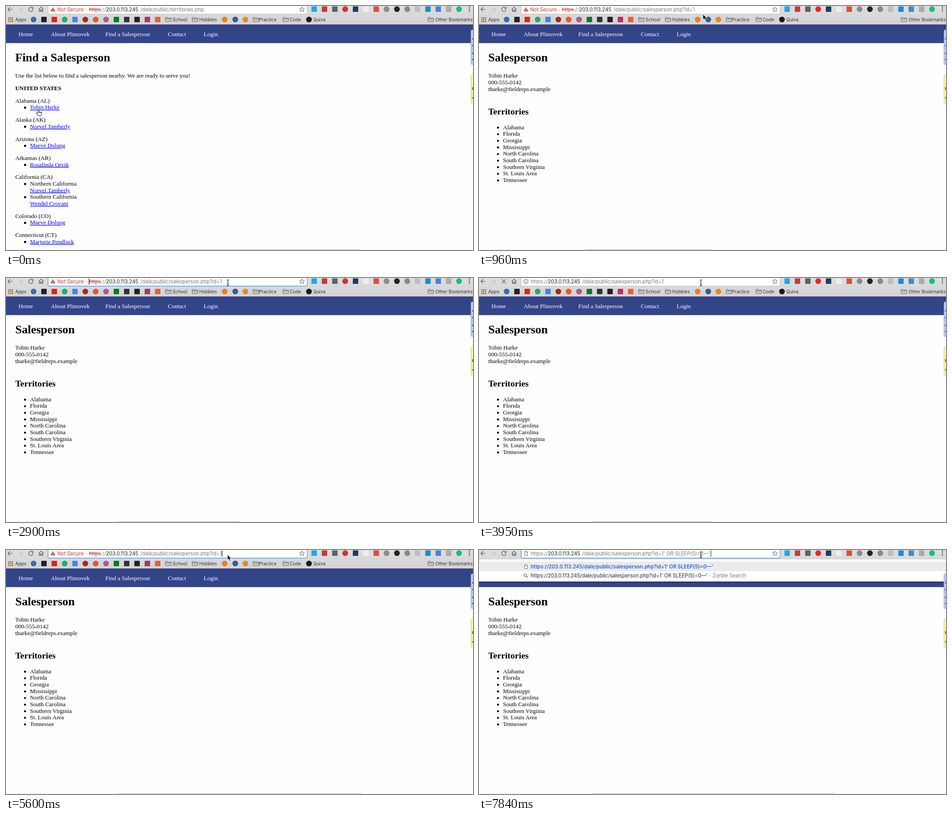
Write an HTML page that moves like this. It is 1032 px wide and 542 px high and loops after 8000 ms.

```html
<!DOCTYPE html>
<html lang="en">
<head>
<meta charset="utf-8">
<title>Sales directory</title>
<style>
  html, body { margin: 0; width: 100%; height: 100%; overflow: hidden; background: #fff; }
  svg { display: block; width: 1032px; height: 542px; }
  text { white-space: pre; }
  .ui { font: 11.1px Inter, "Open Sans", sans-serif; fill: #777; }
  .mark { font: 10px Inter, "Open Sans", sans-serif; fill: #333; }
  .body { font: 13.03px "Liberation Serif", "Times New Roman", serif; fill: #000; }
  .strong { font-weight: 700; }
  .link { fill: #00e; text-decoration: underline; }
  .line { fill: none; stroke: #666; stroke-width: 1.4; }
</style>
</head>
<body>
<svg id="stage" viewBox="0 0 1032 542" xmlns="http://www.w3.org/2000/svg"></svg>
<script>
const LINE = 14.66;
const HOST = '203.0.113.245';
const PERSON = '/dale/public/salesperson.php?id=1';
const TYPED = PERSON + '‘ OR SLEEP(5)=0—‘';

const rect = (x, y, w, h, fill, more = '') =>
  `<rect x="${x}" y="${y}" width="${w}" height="${h}" fill="${fill}" ${more}/>`;
const dot = (x, y, r, fill) => `<circle cx="${x}" cy="${y}" r="${r}" fill="${fill}"/>`;
const path = (d, more = 'class="line"') => `<path d="${d}" ${more}/>`;
const text = (x, y, s, cls = 'body', more = '') =>
  `<text x="${x}" y="${y}" class="${cls}" ${more}>${s}</text>`;
const group = (id, inner) => `<g id="${id}">${inner}</g>`;
const title = (y, size, s) => text(20.4, y, s, 'body strong', `style="font-size:${size}px"`);

// Address in three pieces: scheme, host, path
function address(x, tail, unsafe) {
  const scheme = unsafe
    ? '<tspan fill="#c53929" text-decoration="line-through">https</tspan>://'
    : 'https://';
  return text(x, 11.6, scheme, 'ui') +
    text(x + 38, 11.6, HOST, 'ui', 'style="fill:#222"') +
    text(x + 114, 11.6, tail, 'ui');
}

const warning =
  path('M103.7 2.6L108.8 11.8H98.6Z', 'fill="#c53929"') +
  rect(103.1, 5.6, 1.2, 3, '#fff') + rect(103.1, 9.4, 1.2, 1.2, '#fff') +
  text(113.2, 11.6, 'Not Secure', 'ui', 'style="fill:#c53929"') +
  rect(177, 2, 1, 11, '#ccc');

const info =
  '<circle cx="103.6" cy="7.4" r="4.7" class="line" style="stroke-width:1.1"/>' +
  rect(103, 6.6, 1.2, 3.4, '#666') + rect(103, 4.6, 1.2, 1.2, '#666');

const sheet = y =>
  path(`M100.8 ${y - 4.5}H104.6L107 ${y - 2}V${y + 4.7}H100.8ZM104.4 ${y - 4.5}V${y - 2}H107`,
    'fill="#fff" stroke="#666"');

const folder = x =>
  path(`M${x} 26.2Q${x} 25.2 ${x + 1} 25.2H${x + 4.5}L${x + 5.8} 26.7H${x + 11.5}Q${x + 12.5} 26.7 ${x + 12.5} 27.7` +
    `V33.6Q${x + 12.5} 34.6 ${x + 11.5} 34.6H${x + 1}Q${x} 34.6 ${x} 33.6ZM${x} 28.4H${x + 12.5}`,
    'fill="#c6c6c6" stroke="#6d6d6d"');

const badge = (x, y, color, round) =>
  round ? dot(x, y, 6.3, color) : rect(x - 6, y - 6, 12, 12, color, 'rx="1"');

function toolbar() {
  const nav =
    path('M14.5 7.4H4.5M9 2.6L4.2 7.4L9 12.2') +
    path('M26.5 7.4H36.5M32 2.6L36.8 7.4L32 12.2', 'fill="none" stroke="#c3c3c3" stroke-width="1.4"') +
    path('M72.2 7.8L77.6 2.4L83 7.8M74 6.8V12.4H76.3V8.8H79V12.4H81.2V6.8');
  const star = path('M654 2L655.5 5.8L659.5 6.1L656.4 8.6L657.4 12.5L654 10.3L650.6 12.5L651.6 8.6L648.5 6.1L652.5 5.8Z',
    'fill="none" stroke="#666"');
  const tools = [['#1ba8ee'], ['#c23b35'], ['#596170'], ['#e02a28', 1], ['#183c66'], ['#eee'],
    ['#e04b40'], ['#8b8b8b', 1], ['#222', 1], ['#888', 1], ['#bdbdbd'], ['#168edc'],
    ['#4388c8'], ['#a9a9a9'], ['#15bd82', 1]]
    .map(([c, round], i) => badge(681 + i * 22.86, 7, c, round)).join('');
  const more = [2.5, 7, 11.5].map(y => dot(1024, y, 1.4, '#555')).join('');
  return { back: rect(0, 0, 1032, 41, 'url(#chrome)'), front: nav + star + tools + more };
}

function bookmarks() {
  const hues = ['#e34b3d', '#eda12b', '#52a655', '#4285d8'];
  let out = '';
  for (let i = 0; i < 9; i++)
    out += rect(5 + i % 3 * 4, 25 + Math.floor(i / 3) * 4, 2.8, 2.8, hues[(i * 3 + i % 2) % 4]);
  out += [['#326fb9', 1], ['#222'], ['#e62117'], ['#2aa866', 1], ['#4285e8'], ['#a82b22', 1],
    ['#f2502a', 1], ['#b0568a', 1], ['#087a24'], ['#333'], ['#222'], ['#b82c70'], ['#ed5c29']]
    .map(([c, round], i) => badge(61 + i * 22.86, 30, c, round)).join('');
  out += badge(483.3, 30, '#ef7c24', 1) + badge(506.6, 30, '#315e96', 1) +
    badge(529, 30, '#e48a24', 1) + badge(669.5, 30, '#181818', 1);
  out += [352.5, 411.5, 546, 612, 932.5].map(folder).join('');
  out += [[20.5, 'Apps'], [368, 'School'], [427, 'Hobbies'], [559, 'Practice'], [627, 'Code'],
    [679, 'Quiva'], [949, 'Other Bookmarks']]
    .map(([x, s]) => text(x, 33.6, s, 'mark')).join('');
  return out;
}

function siteNav() {
  return rect(0, 41, 1032, 41.4, '#348') +
    [[27.8, 'Home'], [99, 'About Plimovek'], [219.6, 'Find a Salesperson'], [357.5, 'Contact'], [437, 'Login']]
      .map(([x, s]) => text(x, 67, s, 'body', 'style="fill:#fff"')).join('');
}

function listPage() {
  let y = 214.8;
  let out = title(123, 26.06, 'Find a Salesperson') +
    text(20.4, 159.3, 'Use the list below to find a salesperson nearby. We are ready to serve you!') +
    text(20.4, 187, 'UNITED STATES', 'body strong');
  const add = (x, s, cls) => { out += text(x, y, s, cls); y += LINE; };
  const bullet = () => { out += rect(40, y - 5.8, 4.4, 4.4, '#000'); };
  const who = s => add(53, s, 'body link');
  const states = [
    ['Alabama (AL)', 'Tobin Harke'],
    ['Alaska (AK)', 'Norvel Tamberly'],
    ['Arizona (AZ)', 'Maeve Dolung'],
    ['Arkansas (AR)', 'Rosalinda Orvik'],
    ['California (CA)', ['Northern California', 'Norvel Tamberly'], ['Southern California', 'Wendel Crovani']],
    ['Colorado (CO)', 'Maeve Dolung'],
    ['Connecticut (CT)', 'Marjorie Pendlock']
  ];
  for (const [state, ...rows] of states) {
    add(20.4, state);
    for (const row of rows) {
      bullet();
      if (Array.isArray(row)) { add(53, row[0]); who(row[1]); } else who(row);
    }
    y += 13.07;
  }
  return out;
}

function personPage() {
  const lines = ['Tobin Harke', '000-555-0142', 'tharke@fieldreps.example'];
  const areas = ['Alabama', 'Florida', 'Georgia', 'Mississippi', 'North Carolina', 'South Carolina',
    'Southern Virginia', 'St. Louis Area', 'Tennessee'];
  return title(123, 26.06, 'Salesperson') +
    lines.map((s, i) => text(20.4, 159.3 + i * LINE, s)).join('') +
    title(241, 19.55, 'Territories') +
    areas.map((s, i) => dot(42, 270.2 + i * LINE, 2.2, '#000') + text(53, 273.8 + i * LINE, s)).join('');
}

function notes() {
  const note = (y, h, fill, edge, marks) =>
    rect(1027.5, y, 12, h, fill, `rx="3" stroke="${edge}"`) +
    marks.map(m => rect(1030, m, 2, 2, '#222')).join('');
  return note(53, 77, '#b7ccfa', '#8fa5d8', [72, 87, 104, 118]) +
    note(153, 63, '#fdf2a0', '#d8c974', [181, 184, 203]);
}

function menu() {
  const full = 'https://' + HOST + TYPED;
  return rect(0, 21, 1032, 49, '#fff') + rect(0, 26, 1032, 21, '#ebebeb') +
    rect(0, 70, 1032, 4, 'url(#shade)') +
    sheet(37) + text(114.3, 41, full, 'ui', 'style="fill:#2f62d9;font-weight:600"') +
    '<circle cx="102.4" cy="56" r="3" class="line" style="stroke-width:1.2"/>' + path('M104.6 58.2L108 61.6') +
    text(114.3, 61.2, full + '<tspan fill="#777"> - Zorble Search</tspan>', 'ui', 'style="fill:#222"');
}

const pointers = {
  hand: path('M-2 -5.5Q-2 -7 -.7 -7Q.5 -7 .5 -5.5V-2.2Q2 -3 2.6 -1.8Q4.3 -2.4 4.7 -1Q6.4 -1.2 6.4 .6V3Q6 5 5 6.8H-1.6Q-3.4 4 -5.6 1.4Q-5.6 -.4 -3.6 .4L-2 2ZM.6 -2V1M2.7 -1.6V1M4.7 -.8V1.4',
    'fill="#fff" stroke="#111" stroke-width="1"'),
  arrow: path('M0 0V11.8L2.7 9.3L4.6 13.6L6.5 12.8L4.7 8.6H8.3Z', 'fill="#000" stroke="#fff" stroke-width=".8"'),
  beam: path('M-2.6 -6.5Q0 -6.5 0 -5V5Q0 6.5 -2.6 6.5M2.6 -6.5Q0 -6.5 0 -5V5Q0 6.5 2.6 6.5M-1.5 2H1.5',
    'fill="none" stroke="#111" stroke-width="1.1"')
};

const bar = toolbar();
document.getElementById('stage').innerHTML =
  `<defs>
    <linearGradient id="chrome" x2="0" y2="1"><stop stop-color="#dedede"/><stop offset="1" stop-color="#d3d3d3"/></linearGradient>
    <linearGradient id="shade" x2="0" y2="1"><stop stop-color="#000" stop-opacity=".3"/><stop offset="1" stop-color="#000" stop-opacity="0"/></linearGradient>
  </defs>` +
  rect(0, 0, 1032, 542, '#fefefe') +
  group('page-list', listPage()) + group('page-person', personPage()) +
  rect(0, 540.6, 1032, 1.4, '#eee') + rect(0, 540, 0, 2, '#d2d2d2', 'id="scroll"') +
  bar.back + bookmarks() + siteNav() + group('menu', menu()) + notes() +
  rect(93, -6, 572.5, 24, '#fff', 'rx="3" stroke="#b9b9b9"') +
  rect(93, -6, 572.5, 24, 'none', 'rx="3" stroke="#6ba2e4" stroke-width="1.4" id="ring"') +
  bar.front +
  group('idle', path('M59 4.6A4.8 4.8 0 1 0 59.8 8.2') + path('M60.4 1.8V6.4H55.8Z', 'fill="#666"')) +
  group('busy', path('M50.3 2.8L59.5 12M59.5 2.8L50.3 12')) +
  rect(183, 1, 295, 14, '#b3d5fd', 'id="sel"') +
  group('url-list', warning + address(183, '/dale/public/territories.php', true)) +
  group('url-load', info + address(114.3, PERSON)) +
  group('url-person', warning + address(183, PERSON, true)) +
  group('url-typed', sheet(7.3) + address(114.3, TYPED)) +
  rect(0, 1, 1, 14, '#000', 'id="caret"') +
  group('pointer', Object.entries(pointers).map(([k, s]) => group(k, s)).join(''));

// Each step changes only what it names
const steps = [
  [0, { page: 'list', url: 'list', busy: 0, ring: 0, sel: 0, caret: 0, menu: 0, cur: ['hand', 72.5, 237], scroll: [251, 784] }],
  [150, { url: 'load', busy: 1 }],
  [310, { cur: ['arrow', 110, 215] }],
  [470, { page: 'person', cur: ['arrow', 235, 148], scroll: [235, 341] }],
  [640, { url: 'person', cur: ['arrow', 392, 68] }],
  [800, { busy: 0, cur: ['arrow', 478, 28] }],
  [960, { cur: ['arrow', 495, 18.5], scroll: [235, 515] }],
  [1110, { cur: ['arrow', 486.5, 20.5], scroll: [249, 515] }],
  [1250, { ring: 0.5, sel: 1 }],
  [1400, { ring: 1 }],
  [1700, { sel: 0, caret: 183 }],
  [2300, { caret: 0, cur: ['arrow', 487, 16] }],
  [2450, { cur: ['beam', 489, 12] }],
  [2600, { cur: ['beam', 490.4, 10.5] }],
  [2900, { caret: 183 }],
  [3350, { caret: 0 }],
  [3650, { caret: 477 }],
  [3950, { caret: 0, ring: 0, url: 'load', busy: 1 }],
  [4550, { url: 'person', scroll: [249, 785] }],
  [4850, { busy: 0 }],
  [5300, { ring: 1, sel: 1, cur: ['arrow', 489.5, 10.5] }],
  [5600, { sel: 0, caret: 477 }],
  [6200, { caret: 0 }],
  [6800, { caret: 477 }],
  [7250, { caret: 0 }],
  [7700, { url: 'typed', caret: 512, cur: ['beam', 490.4, 10.5] }],
  [7840, { menu: 1 }]
];

const el = id => document.getElementById(id);
const show = (id, on) => { el(id).style.display = on ? '' : 'none'; };

function render(t) {
  const s = Object.assign({}, ...steps.filter(([at]) => at <= t).map(([, change]) => change));
  for (const p of ['list', 'person']) show('page-' + p, s.page === p);
  for (const u of ['list', 'load', 'person', 'typed']) show('url-' + u, s.url === u);
  for (const k in pointers) show(k, s.cur[0] === k);
  show('busy', s.busy);
  show('idle', !s.busy);
  show('menu', s.menu);
  show('sel', s.sel);
  show('caret', s.caret);
  el('caret').setAttribute('x', s.caret);
  el('ring').style.opacity = s.ring;
  el('pointer').setAttribute('transform', `translate(${s.cur[1]} ${s.cur[2]})`);
  el('scroll').setAttribute('x', s.scroll[0]);
  el('scroll').setAttribute('width', s.scroll[1] - s.scroll[0]);
}

const start = performance.now();
function tick() {
  render((performance.now() - start) % 8000);
  requestAnimationFrame(tick);
}
tick();
</script>
</body>
</html>
```
